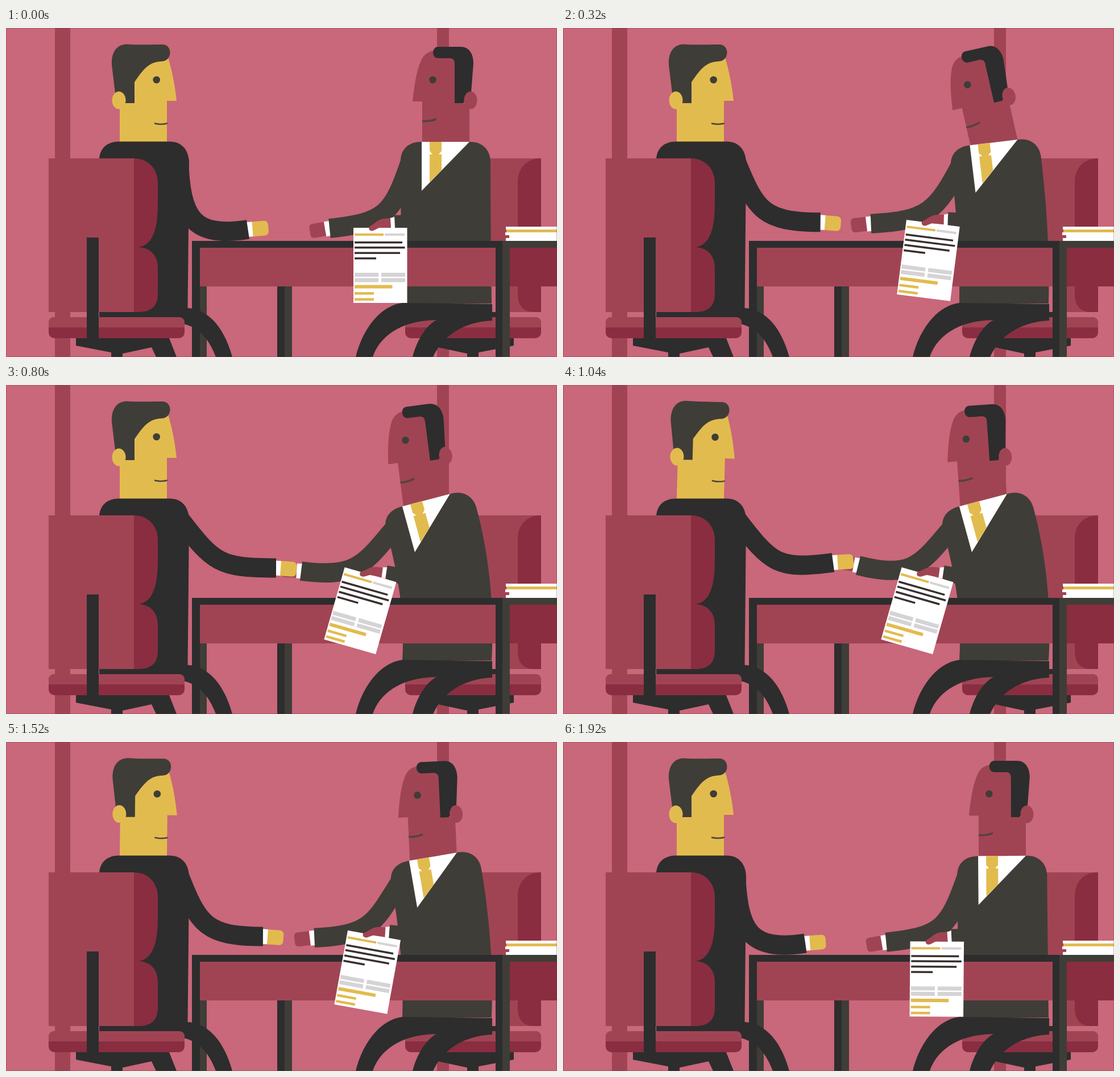
Animation, 969 px wide and 578 px high, one loop 2.42 s. Source, as an HTML page:

```html
<!DOCTYPE html>
<html lang="en">
<head>
<meta charset="utf-8">
<title>Handshake</title>
<style>
html, body { margin: 0; width: 100%; height: 100%; overflow: hidden; background: #c9677b; }
svg { display: block; width: 969px; height: 578px; }
.rose { fill: #a04454; }
.wine { fill: #8a2d41; }
.ink { fill: #2d2d2d; }
.olive { fill: #3f3d37; }
.gold { fill: #e2bb4f; }
.white { fill: #fff; }
.grey { fill: #d5d3d5; }
.line { fill: none; stroke: #54433f; }
.arm { fill: none; stroke-width: 34; }
</style>
</head>
<body>
<svg viewBox="0 0 969 578">
  <rect width="969" height="578" fill="#c9677b"/>
  <path class="rose" d="M86 0H113V578H86ZM758 0H779V578H758Z"/>

  <!-- right chair -->
  <path class="rose" d="M791 229H941V499H886V454H791Z"/>
  <path class="wine" d="M941 229C914 229 900 248 900 270V468C900 488 910 499 928 499H941Z"/>
  <path class="ink" d="M760 499H861V508H760ZM893 545V558L831 570V578H811V572L760 561V545Z"/>
  <rect class="wine" x="702" y="508" width="239" height="37" rx="10"/>
  <path class="rose" d="M702 526V518Q702 508 712 508H931Q941 508 941 518V526Z"/>

  <!-- right man -->
  <g id="headR">
    <path class="rose" d="M732 215V129H715C718 100 722 75 730 57C735 46 744 40 755 40L790 48L800 132H815V215Z"/>
    <path class="ink" d="M760 33H800C814 33 822 45 822 62L818 113L804 132H789V62Q789 53 780 53H760C748 53 748 33 760 33Z"/>
    <ellipse class="rose" cx="817" cy="127" rx="11.5" ry="15.5"/>
    <circle class="olive" cx="750.5" cy="91" r="6.3"/>
    <path class="line" stroke-width="3.5" d="M732 163.500Q745 164.500 757 160"/>
  </g>
  <path class="olive bends" d="M697 484C695 400 694 320 694 234C694 213 708 200 730 200L815 200C838 199 852 215 852 235C852 320 853 400 854 484Z"/>
  <path class="white bends" d="M731 200L815 200L731 286Z"/>
  <path class="gold bends" d="M745 200L766 200L766 216L761 222L766 222L766 250L745 271L745 222L750 222L745 216Z"/>
  <path class="ink" d="M615 578C625 535 655 488 697 483L855 485V514C806 516 768 540 751 578H715C722 550 738 523 757 513C690 514 656 545 645 578Z"/>
  <g id="handR">
    <path class="rose" d="M-7 -13H-28Q-35 -13 -35 -6V5Q-35 12 -28 12H-7Z"/>
    <path class="white" d="M-8 -13H2V13H-8Z"/>
  </g>
  <path id="armR" class="arm" stroke="#3f3d37"/>

  <!-- table -->
  <path class="wine" d="M886 386H969V454H886Z"/>
  <path class="rose" d="M341 386H861V454H341Z"/>
  <path class="olive" d="M341 454H353V578H341ZM490 454H503V578H490ZM873 374H969V386H886V578H873Z"/>
  <path class="ink" d="M327 374H873V578H861V386H341V578H327ZM477 454H490V578H477Z"/>
  <path class="white" d="M879 349H969V374H879V369H885V364H878V359H880V354H879Z"/>
  <path class="gold" d="M880 354H969V359H880Z"/>
  <path class="rose" d="M878 364H885V369H878Z"/>

  <!-- contract -->
  <g class="holds">
    <path class="olive" d="M683 329L714 328V358L684 352Z"/>
    <path class="white" d="M675 334L683 332L684 352H677Z"/>
  </g>
  <g id="paper">
    <path class="white" d="M0 0H94.500V132H0Z"/>
    <path class="gold" d="M2 10H53V14H2ZM2 100.500H68.500V106.500H2ZM2 113H36V117.500H2ZM2 123.500H36V128H2Z"/>
    <path class="grey" d="M55 10H90V14H55ZM2 79H44V86H2ZM49 79H91V86H49ZM2 88.500H44V95.500H2ZM49 88.500H91V95.500H49Z"/>
    <path fill="#3a3030" d="M2 24H86V27.500H2ZM2 33H90.500V36.500H2ZM2 42.500H82V46H2ZM2 52H40V55.500H2Z"/>
  </g>
  <g class="holds">
    <path class="rose" d="M676 334L677 351H656L646 356Q638 358 638 350L648 343Q656 336 664 335Z"/>
  </g>

  <!-- left man -->
  <g id="headL">
    <path class="gold" d="M200 208V130H215L226 90L262 52H285C292 75 297 100 300 128H283V208Z"/>
    <path class="olive" d="M192 114L186 65C185 42 195 29 212 28.500C235 30 255 29 275 29C293 29 293 57 275 58.500C260 59 250 64 240 76C234 83 230 89 226 95V132H208Z"/>
    <ellipse class="gold" cx="198.500" cy="127" rx="12" ry="15.500"/>
    <circle class="olive" cx="264.700" cy="91" r="6.300"/>
    <path class="line" stroke-width="2.500" d="M261 167.500Q272 170.500 284 167.500"/>
  </g>
  <path class="ink" d="M164 235C163 212 178 199.500 198 199.500H288C309 199.500 321 214 322 235L321 350L319.500 492C358 494 385 530 398 578H369C358 548 340 526 312 520L164 508Z"/>
  <g id="handL">
    <path class="gold" d="M7 -13H28Q36 -13 36 -5V5Q36 13 28 13H7Z"/>
    <path class="white" d="M-2 -13H8V13H-2Z"/>
  </g>
  <path id="armL" class="arm" stroke="#2d2d2d"/>

  <!-- left chair -->
  <path class="rose" d="M75 229H225V499H75Z"/>
  <path class="wine" d="M225 229C251 229 267 249 267 272V310C267 355 257 381 234 385C257 387 267 402 267 422V468C267 488 255 499 235 499H225Z"/>
  <path class="ink" d="M123 545V558L185 570V578H205V572L256 561L264 578H300L287 545Z"/>
  <rect class="wine" x="75" y="508" width="239" height="37" rx="10"/>
  <path class="rose" d="M75 526V518Q75 508 85 508H304Q314 508 314 518V526Z"/>
  <path class="ink" d="M142 368H163V545H142Z"/>
  <rect x=".5" y=".5" width="968" height="577" fill="none" stroke="#8a2d41" stroke-opacity=".35"/>
</svg>
<script>
const el = id => document.getElementById(id);
const all = name => [...document.getElementsByClassName(name)];
const mix = (a, b, u) => a + (b - a) * u;
const place = (node, transform) => node.setAttribute("transform", transform);
const clothes = all("bends").map(node => ({ node, upright: node.getAttribute("d") }));

const ease = x => {
  x = Math.min(1, Math.max(0, x));
  return x * x * (3 - 2 * x);
};
// Rises over [a, b], falls over [c, d]
const swell = (t, a, b, c, d) => ease((t - a) / (b - a)) - ease((t - c) / (d - c));

// Leans a point of the right man's body; the hips stay put
function bend(x, y, lean) {
  const w = lean * ease((460 - y) / 140), dx = x - 731, dy = y - 200;
  return [x + w * (.233 * dy - 31), y + w * (12 - .238 * dx - .058 * dy)];
}

// Thick curve from shoulder to wrist; reach is the signed forearm length
function arm(side, shoulder, elbow, [x, y, angle], reach) {
  const a = angle * Math.PI / 180;
  const forearm = [x - reach * Math.cos(a), y - reach * Math.sin(a)];
  el("arm" + side).setAttribute("d", `M${shoulder}C${elbow} ${forearm} ${x} ${y}`);
  place(el("hand" + side), `translate(${x} ${y}) rotate(${angle + 4 * Math.sign(reach)})`);
}

function draw(t) {
  const lean = 1.1 * swell(t, 0, 680, 1200, 2000);
  const meet = swell(t, 0, 600, 1100, 1980);
  const nod = 11 * swell(t, 0, 320, 400, 1040);
  const tilt = 5.3 * swell(t, 900, 1300, 1300, 1580);
  const shake = t > 560 && t < 1200 ? Math.sin(Math.PI * (t - 560) / 320) ** 2 : 0;

  for (const { node, upright } of clothes) {
    node.setAttribute("d", upright.replace(/(\d+) (\d+)/g, (_, x, y) => bend(+x, +y, lean).join(" ")));
  }
  for (const node of all("holds")) {
    place(node, `translate(${-12 * lean} ${-12 * lean}) rotate(${10 * lean} 676 334)`);
  }
  place(el("paper"), `translate(${611 - 14 * lean} ${351 - 28 * lean}) rotate(${14.5 * lean})`);
  place(el("headR"), `translate(${-31 * lean} ${2 * lean}) rotate(${-nod - 3.6 * lean} 773 200)`);
  place(el("headL"), `rotate(${tilt} 242 200)`);

  const wristL = [mix(425.5, 475, meet), mix(354, 331, meet) - 19 * shake, mix(-8.5, 8, meet) - 15.5 * shake];
  const wristR = [mix(569, 519, meet), mix(352, 337, meet) - 20 * shake, mix(-6, 0, meet) + 14 * shake];
  arm("L", [304, 233], [mix(308, 366, meet), mix(332, 314, meet)], wristL, 100);
  arm("R", bend(712, 232, lean), [680 - 46 * lean, 326 - 10 * lean], wristR, -100);
}

const start = performance.now();
function tick() {
  const t = (performance.now() - start) % 2420;
  draw(Math.min(24, Math.floor(t / 80)) * 80);
  requestAnimationFrame(tick);
}
tick();
</script>
</body>
</html>
```
